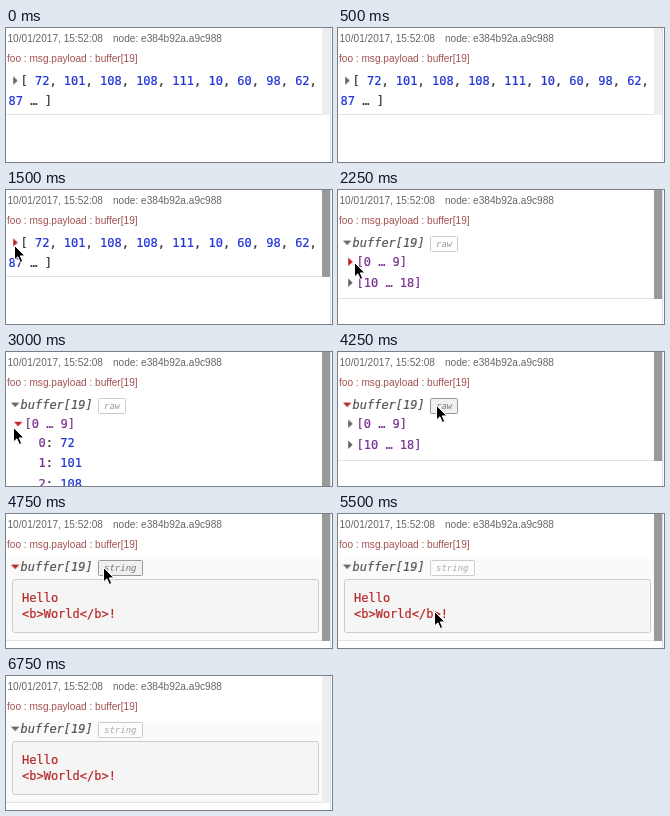
Animation of 326x134 px, one loop 7 s. Source, as an HTML page:

```html
<!DOCTYPE html>
<html lang="en">
<head>
<meta charset="utf-8">
<title>Debug message inspector</title>
<style>
html, body { margin: 0; width: 100%; height: 100%; overflow: hidden; background: #fff; }
#stage { position: relative; width: 326px; height: 134px; overflow: hidden; }
:where(#stage *, #msg::after) { animation: 7s step-end infinite; }

#msg { position: absolute; left: 0; top: 0; width: 324px; box-sizing: border-box;
  border-bottom: 1px solid #e2e2e2; animation-name: height; }
#msg::after { content: ""; position: absolute; right: 0; top: 0; bottom: -1px; width: 8px;
  animation: bar 7s step-end infinite; }
#edge { position: absolute; left: 324px; top: 0; width: 1px; height: 134px; background: #ddd; }
#tint { position: absolute; left: 0; top: 45px; width: 316px; height: 81px; background: #fafafa; }

svg { position: absolute; left: 0; top: 0; }
text { white-space: pre; font: 12px "DejaVu Sans Mono", monospace; color: #333; }
text, tspan { fill: currentColor; stroke: currentColor; stroke-width: .2px; }
.meta { font: 10.1px "Liberation Sans", Arial, sans-serif; color: #666; stroke: none; }
.topic { color: #a25050; }
.num { color: #2033d6; }
.key { color: #792e90; }
.str { color: #b72828; }
.type { font-style: italic; color: #555; }
.btn text { font-size: 9px; font-style: italic; stroke: none; animation-name: btnText; }
.btn rect { animation-name: btnBox; }

.list { animation-name: list; }
.head { animation-name: head; }
.rows { animation-name: rows; }
.tail { animation-name: tail; }
.items { animation-name: items; }
.string { animation-name: string; }
.caret { fill: #666; }
.c1 { animation-name: turn1, red1; }
.c2 { animation-name: turn2, red2; }
#cursor { animation-name: move, hover; }

@keyframes height {
  0% { height: 87px; } 25% { height: 109px; } 42.857% { height: 190px; }
  50% { height: 109px; } 67.857%, 100% { height: 127px; }
}
@keyframes bar {
  0% { background: #eee; } 14.285% { background: #999; } 89.285%, 100% { background: #eee; }
}
@keyframes hover {
  0% { visibility: hidden; } 14.285% { visibility: visible; } 89.285%, 100% { visibility: hidden; }
}
@keyframes list { 0% { visibility: visible; } 25%, 100% { visibility: hidden; } }
@keyframes head { 0% { visibility: hidden; } 25%, 100% { visibility: visible; } }
@keyframes rows {
  0% { visibility: hidden; } 25% { visibility: visible; } 67.857%, 100% { visibility: hidden; }
}
@keyframes tail {
  0% { visibility: hidden; } 25% { visibility: visible; } 42.857% { visibility: hidden; }
  50% { visibility: visible; } 67.857%, 100% { visibility: hidden; }
}
@keyframes items {
  0% { visibility: hidden; } 42.857% { visibility: visible; } 50%, 100% { visibility: hidden; }
}
@keyframes string { 0% { visibility: hidden; } 67.857%, 100% { visibility: visible; } }
@keyframes btnBox {
  0% { fill: #f3f3f3; stroke: #999; } 32.142% { fill: #fff; stroke: #ccc; }
  60.714% { fill: #f0f0f0; stroke: #999; } 75%, 100% { fill: #fcfcfc; stroke: #ccc; }
}
@keyframes btnText {
  0% { color: #777; } 32.142% { color: #999; } 60.714% { color: #777; } 75%, 100% { color: #aaa; }
}
@keyframes turn1 {
  0% { transform: none; } 25% { transform: rotate(45deg); } 28.571%, 100% { transform: rotate(90deg); }
}
@keyframes red1 {
  0% { fill: #666; } 14.285% { fill: #b72828; } 32.142% { fill: #666; }
  60.714% { fill: #b72828; } 75%, 100% { fill: #666; }
}
@keyframes turn2 {
  0% { transform: none; } 42.857% { transform: rotate(90deg); }
  50% { transform: rotate(45deg); } 53.571%, 100% { transform: none; }
}
@keyframes red2 { 0% { fill: #666; } 32.142% { fill: #c22020; } 60.714%, 100% { fill: #666; } }
@keyframes move {
  0%, 14.285% { transform: translate(28px, 60px); }
  17.857% { transform: translate(11px, 57px); }
  21.428% { transform: translate(8px, 55px); }
  32.142% { transform: translate(16px, 72px); }
  35.714% { transform: translate(12px, 75px); }
  39.285% { transform: translate(6px, 76px); }
  42.857% { transform: translate(7px, 75px); }
  46.428% { transform: translate(6px, 75px); }
  53.571% { transform: translate(10px, 74px); }
  57.142% { transform: translate(85px, 64px); }
  60.714% { transform: translate(98px, 53px); }
  67.857% { transform: translate(97px, 53px); }
  75% { transform: translate(87px, 71px); }
  78.571% { transform: translate(96px, 97px); }
  85.714%, 100% { transform: translate(276px, 38px); }
}
</style>
</head>
<body>
<div id="stage">
  <div id="tint" class="string"></div>
  <div id="msg"></div>
  <div id="edge"></div>
  <svg width="326" height="134" viewBox="0 0 326 134">
    <defs><path id="tri" d="M-2-4.3L2.5 0L-2 4.3Z"/></defs>

    <text class="meta" x="1.5" y="14">10/01/2017, 15:52:08</text>
    <text class="meta" x="107" y="14">node: e384b92a.a9c988</text>
    <text class="meta topic" x="1" y="34">foo : msg.payload : buffer[19]</text>

    <g class="list">
      <text x="14.5" y="57">[ <tspan class="num">72</tspan>, <tspan class="num">101</tspan>, <tspan class="num">108</tspan>, <tspan class="num">108</tspan>, <tspan class="num">111</tspan>, <tspan class="num">10</tspan>, <tspan class="num">60</tspan>, <tspan class="num">98</tspan>, <tspan class="num">62</tspan>,</text>
      <text x="2.5" y="77"><tspan class="num">87</tspan> … ]</text>
    </g>

    <g transform="translate(9.2 52.6)"><use class="caret c1" href="#tri"/></g>

    <g class="head">
      <text class="type" x="14.5" y="57">buffer[19]</text>
    </g>
    <g class="rows btn">
      <rect x="92.5" y="46.5" width="27" height="15" rx="1"/>
      <text x="98" y="57">raw</text>
    </g>

    <g class="rows">
      <g transform="translate(12.2 71.8)"><use class="caret c2" href="#tri"/></g>
      <text class="key" x="18.5" y="76">[0 … 9]</text>
    </g>
    <g class="tail">
      <g transform="translate(12.2 92.7)"><use class="caret" href="#tri"/></g>
      <text class="key" x="18.5" y="97">[10 … 18]</text>
    </g>
    <g class="items">
      <text x="32.5" y="94.5"><tspan class="key">0</tspan>: <tspan class="num">72</tspan></text>
      <text x="32.5" y="115"><tspan class="key">1</tspan>: <tspan class="num">101</tspan></text>
      <text x="32.5" y="135.5"><tspan class="key">2</tspan>: <tspan class="num">108</tspan></text>
    </g>

    <g class="string btn">
      <rect x="92.5" y="46.5" width="44" height="15" rx="1"/>
      <text x="98" y="57">string</text>
    </g>
    <g class="string">
      <rect x="6.5" y="65.5" width="306" height="53" rx="2" fill="#f5f5f5" stroke="#ccc"/>
      <text class="str" x="16" y="88">Hello</text>
      <text class="str" x="16" y="104">&lt;b&gt;World&lt;/b&gt;!</text>
    </g>

    <path id="cursor" d="M.5.5V15L3.9 11.8L6.3 17.4L8.7 16.4L6.3 10.9H11Z" fill="#000" stroke="#fff" stroke-width="1"/>
  </svg>
</div>
</body>
</html>
```
